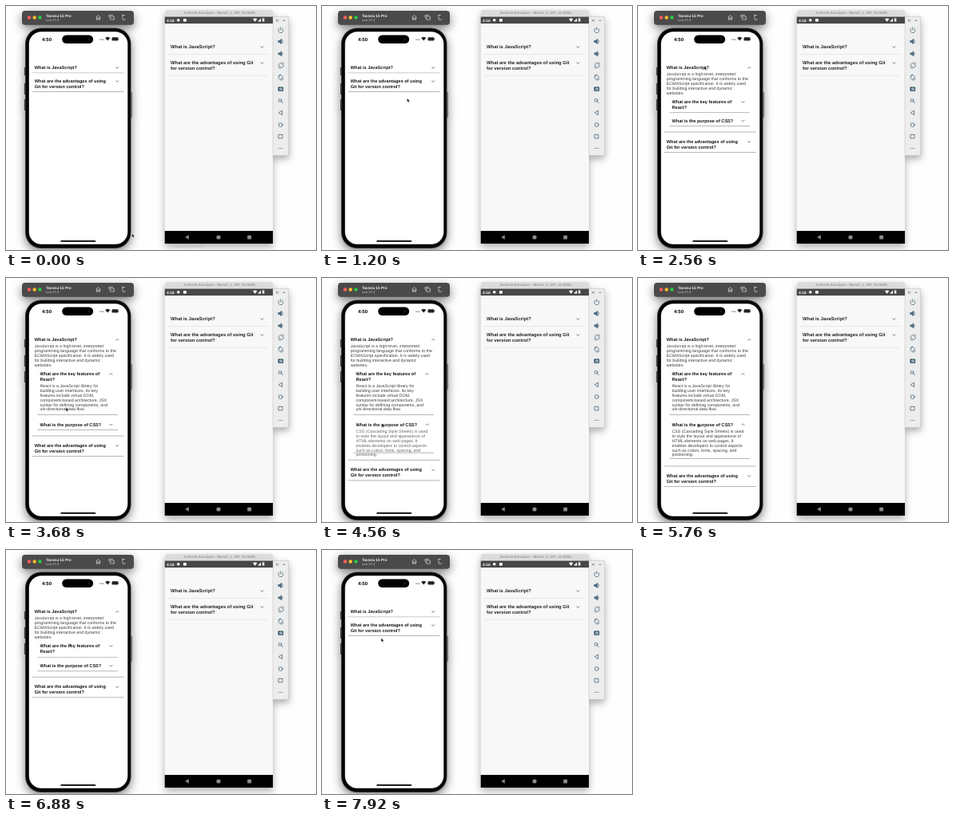
Write an HTML page that moves like this. It is 388 px wide and 306 px high and loops after 8 s.

```html
<!DOCTYPE html>
<html lang="en">
<head>
<meta charset="utf-8">
<title>Nested accordion on two devices</title>
<style>
html, body { margin: 0; width: 100%; height: 100%; overflow: hidden; background: #fefefe; }
svg { display: block; width: 388px; height: 306px; }
text { font-family: "Liberation Sans", Arial, sans-serif; text-rendering: geometricPrecision; white-space: pre; }
.bold { font-weight: 700; }
.line { fill: none; stroke-width: .8; stroke-linecap: round; stroke-linejoin: round; }
.phone { filter: drop-shadow(0 4px 6px rgba(0,0,0,.5)); }
.window { filter: drop-shadow(0 4px 5px rgba(0,0,0,.32)); }
</style>
</head>
<body>
<svg id="stage" viewBox="0 0 388 306">
  <!-- phone and its toolbar -->
  <g class="phone">
    <rect x="20" y="6" width="140" height="17.8" rx="4" fill="#4b4a4b"/>
    <path d="M23.5 77v10M23.5 97v14M23.5 117v14M157 108v32" stroke="#333"/>
    <rect x="24" y="27.5" width="132.5" height="276.5" rx="20" fill="#3c3d40"/>
    <rect x="24.8" y="28.3" width="130.9" height="274.9" rx="19.3" fill="#050505"/>
  </g>
  <circle cx="29" cy="14.5" r="2.2" fill="#fe5f57"/>
  <circle cx="35.7" cy="14.5" r="2.2" fill="#febc2e"/>
  <circle cx="42.4" cy="14.5" r="2.2" fill="#28c840"/>
  <text class="bold" x="50" y="14.3" font-size="4.7" fill="#f4f4f4">Tavona 15 Pro</text>
  <text x="50" y="19" font-size="4.2" fill="#d4d4d4">Lun 17.4</text>
  <g class="line" stroke="#c9c9c9" stroke-width=".6">
    <path d="M112.7 14.3l2.8-2.6 2.8 2.6M113.5 14v3.2h1.3v-2h1.4v2h1.3V14"/>
    <path d="M129 14.5v-3h4.5M131 13.2h4.4v3.8H131z"/>
    <path d="M146 11.5v5.6h3.4M145.4 11.5h3"/>
  </g>
  <rect x="28.8" y="32.3" width="123.5" height="266.5" rx="15.5" fill="#fff"/>
  <rect x="70.2" y="36.5" width="39" height="10.5" rx="5.25"/>
  <circle cx="103.6" cy="41.7" r="1.8" fill="#11131d"/>
  <text class="bold" x="45" y="43.5" font-size="6">4:50</text>
  <g fill="#222">
    <circle cx="118" cy="42.1" r=".6"/><circle cx="120" cy="42.1" r=".6"/><circle cx="122" cy="42.1" r=".6"/>
    <path d="M124.2 40.2q3-2.7 6 0l-3 3.4z"/>
    <rect x="132.5" y="39.2" width="8" height="4.2" rx="1.2"/>
    <rect x="140.8" y="40.5" width=".6" height="1.6" fill="#888"/>
  </g>
  <rect x="68.3" y="294" width="44" height="1.7" rx=".85"/>
  <g id="list"></g>

  <!-- emulator window -->
  <g class="window">
    <path d="M199 14V8q0-3 3-3h129q3 0 3 3v6z" fill="#dcdcdc"/>
    <rect x="198.7" y="13.5" width="135.3" height="284.5" fill="#f8f8f8"/>
    <rect x="334" y="13.5" width="19.8" height="174" fill="#ededed" stroke="#bbb" stroke-width=".5"/>
  </g>
  <text id="hint" x="212" y="302.5" font-size="5" fill="#bbb">Loading bundle...</text>
  <text class="bold" x="267" y="10.4" font-size="4.56" text-anchor="middle" fill="#999">Android Emulator - Mosel_3_API_31:5555</text>
  <rect x="198.7" y="13.5" width="135.3" height="8.5" fill="#474747"/>
  <text class="bold" x="201" y="19.6" font-size="4.8" fill="#fff">4:16</text>
  <g fill="#fff">
    <circle cx="215.7" cy="17.8" r="1.8"/>
    <rect x="222" y="16" width="3.8" height="3.6"/>
    <path d="M309 16.3q2.7-1.8 5.4 0l-2.7 3.4zM319.2 15.4v4.2H315z"/>
    <rect x="321" y="15.4" width="2.3" height="4.2"/>
  </g>
  <rect x="198.7" y="282" width="135.3" height="16"/>
  <g fill="#8c8c8c">
    <path d="M228.8 287.3v5.4l-4.6-2.7z"/>
    <circle cx="266" cy="290" r="2.6"/>
    <rect x="302.2" y="287.7" width="4.8" height="4.8" rx=".4"/>
  </g>
  <g id="static"></g>

  <!-- emulator controls -->
  <g class="line" stroke="#666"><path d="M338.2 17l2.4 2.4M340.6 17l-2.4 2.4M346.8 18.2h2.4"/></g>
  <g class="line" stroke="#456579" stroke-width="1">
    <path d="M342.1 28.2a3 3 0 1 0 3.4 0M343.8 26.8v3"/>
    <path d="M341 43.4h1.5l2-1.9v6l-2-1.9H341z" fill="#456579"/><path d="M345.7 42.2q2 2.3 0 4.6"/>
    <path d="M341.4 58.8h1.5l2-1.9v6l-2-1.9h-1.5z" fill="#456579"/><path d="M346 59q.8 1 0 2"/>
    <path d="M341.4 73.5l2.3-2.3 4 4-2.3 2.3zM341 76q.4 2 2.4 2.2M345.5 70.8q2 .2 2.4 2.2"/>
    <path d="M346.2 88.5l-2.3-2.3-3 4 2.3 2.3zM347 91q-.4 2-2.4 2.2M341 88q.6-1.8 2-2.1"/>
    <rect x="340.8" y="101.8" width="6" height="4.8" rx=".5" fill="#456579"/>
    <circle cx="343.8" cy="104.2" r="1.2" stroke="#eee"/>
    <circle cx="343" cy="118.3" r="1.9"/><path d="M344.5 119.8l2 2"/>
    <path d="M345.6 131.4v5.2l-4-2.6z"/>
    <circle cx="343.7" cy="149" r="2.4"/>
    <rect x="341.4" y="161.3" width="4.6" height="4.6"/>
  </g>
  <g fill="#555"><circle cx="341.4" cy="178.5" r=".6"/><circle cx="343.7" cy="178.5" r=".6"/><circle cx="346" cy="178.5" r=".6"/></g>

  <path id="cursor" d="M0 0v5l1.2-1.1.8 1.8.9-.4-.8-1.7h1.6z" stroke="#fff" stroke-width=".5"/>
</svg>
<script>
const LOOP = 8000, FADE = 500, GAP = 2;
const $ = id => document.getElementById(id);

function add(parent, tag, attrs, text) {
  const el = document.createElementNS("http://www.w3.org/2000/svg", tag);
  for (const key in attrs) el.setAttribute(key, attrs[key]);
  if (text) el.textContent = text;
  return parent.appendChild(el);
}
const moveTo = (el, x, y) => el.setAttribute("transform", `translate(${x} ${y})`);
const chevron = up => up ? "M-1.5 .4L0-1.1 1.5 .4" : "M-1.5-.8L0 .7 1.5-.8";

const phoneLook = { size: 5.6, step: 6.5, top: 10, pad: 7, ink: "#161616", rule: "#858585", bg: "#fff" };
const emuLook = { size: 5.88, step: 6.8, top: 10, pad: 9.5, ink: "#222", rule: "#dedede", bg: "#f8f8f8" };

// One accordion row; its rule sits below the body and moves with it.
function makeItem(parent, x, width, title, look) {
  const root = add(parent, "g", {});
  const height = look.top + look.pad + look.step * (title.length - 1);
  const body = add(root, "g", {});
  add(root, "rect", { x: x - 3, y: .4, width, height: height - .8, fill: look.bg });
  title.forEach((line, i) => add(root, "text", {
    class: "bold", x, y: look.top + 2 + i * look.step, "font-size": look.size, fill: look.ink
  }, line));
  const arrow = add(root, "path", {
    class: "line", stroke: "#555", d: chevron(false),
    transform: `translate(${x + width - 11.5} ${look.top + .6})`
  });
  const rule = add(root, "path", { d: `M${x - 3} 0h${width}`, stroke: look.rule, "stroke-width": .6 });
  moveTo(body, 0, height);
  moveTo(rule, 0, height);
  return { root, body, arrow, rule, height };
}

function paragraph(parent, x, lines) {
  lines.forEach((line, i) => add(parent, "text", {
    x, y: 3.4 + i * 5.9, "font-size": 5.27, fill: "#3c3c3c"
  }, line));
}

const q1 = ["What is JavaScript?"];
const list = $("list");
const js = makeItem(list, 35.7, 115, q1, phoneLook);
const git = makeItem(list, 35.7, 115, ["What are the advantages of using", "Git for version control?"], phoneLook);
const react = makeItem(js.body, 42.5, 100.5, ["What are the key features of", "React?"], phoneLook);
const css = makeItem(js.body, 42.5, 100.5, ["What is the purpose of CSS?"], phoneLook);

paragraph(js.body, 35.7, ["JavaScript is a high-level, interpreted", "programming language that conforms to the",
  "ECMAScript specification. It is widely used", "for building interactive and dynamic", "websites."]);
paragraph(react.body, 42.5, ["React is a JavaScript library for", "building user interfaces. Its key",
  "features include virtual DOM,", "component-based architecture, JSX", "syntax for defining components, and",
  "uni-directional data flow."]);
paragraph(css.body, 42.5, ["CSS (Cascading Style Sheets) is used", "to style the layout and appearance of",
  "HTML elements on web pages. It", "enables developers to control aspects", "such as colors, fonts, spacing, and", "positioning."]);
moveTo(js.root, 0, 67);
moveTo(react.root, 0, 26);

const emu = $("static");
moveTo(makeItem(emu, 206, 126, q1, emuLook).root, 0, 41);
moveTo(makeItem(emu, 206, 126, ["What are the advantages of using Git", "for version control?"], emuLook).root, 0, 61);

const taps = { js: [2045, 7310], react: [3180, 6445], css: [4220, 5780] };
const path = [
  [0, 159, 288], [420, 159, 288], [720, 110, 122], [1080, 110, 122], [1680, 84.5, 78],
  [2660, 84.5, 78], [3120, 83, 121], [3300, 83, 121], [3680, 76.5, 165], [4060, 76.5, 185],
  [5980, 76.5, 185], [6320, 81, 119.5], [6900, 81, 119.5], [7120, 84, 78], [7420, 84, 78],
  [7900, 75.5, 113], [LOOP, 75.5, 113]
];

const clamp = v => Math.max(0, Math.min(1, v));
const ease = v => v < .5 ? 2 * v * v : 1 - 2 * (1 - v) ** 2;
const progress = (t, [open, close]) => ease(clamp((t - open) / FADE)) - ease(clamp((t - close) / FADE));

function setItem(item, t, tap, full) {
  const p = progress(t, tap), grow = full * p;
  item.body.setAttribute("opacity", p);
  item.arrow.setAttribute("d", chevron(t >= tap[0] && t < tap[1]));
  moveTo(item.rule, 0, item.height + grow - GAP * p);
  return grow;
}

function render(t) {
  const reactGrow = setItem(react, t, taps.react, 40);
  const cssGrow = setItem(css, t, taps.css, 38);
  const jsGrow = setItem(js, t, taps.js, 76 + reactGrow + cssGrow);
  moveTo(css.root, 0, 49.5 + reactGrow);
  moveTo(git.root, 0, 84 + jsGrow);

  const i = path.findIndex(p => p[0] > t);
  const [t0, x0, y0] = path[i - 1], [t1, x1, y1] = path[i];
  const k = ease((t - t0) / (t1 - t0));
  moveTo($("cursor"), x0 + (x1 - x0) * k - 1.5, y0 + (y1 - y0) * k - 2.7);
  $("hint").setAttribute("opacity", t < 80 ? 1 : 0);
}

function tick() {
  render(performance.now() % LOOP);
  requestAnimationFrame(tick);
}
tick();
</script>
</body>
</html>
```
